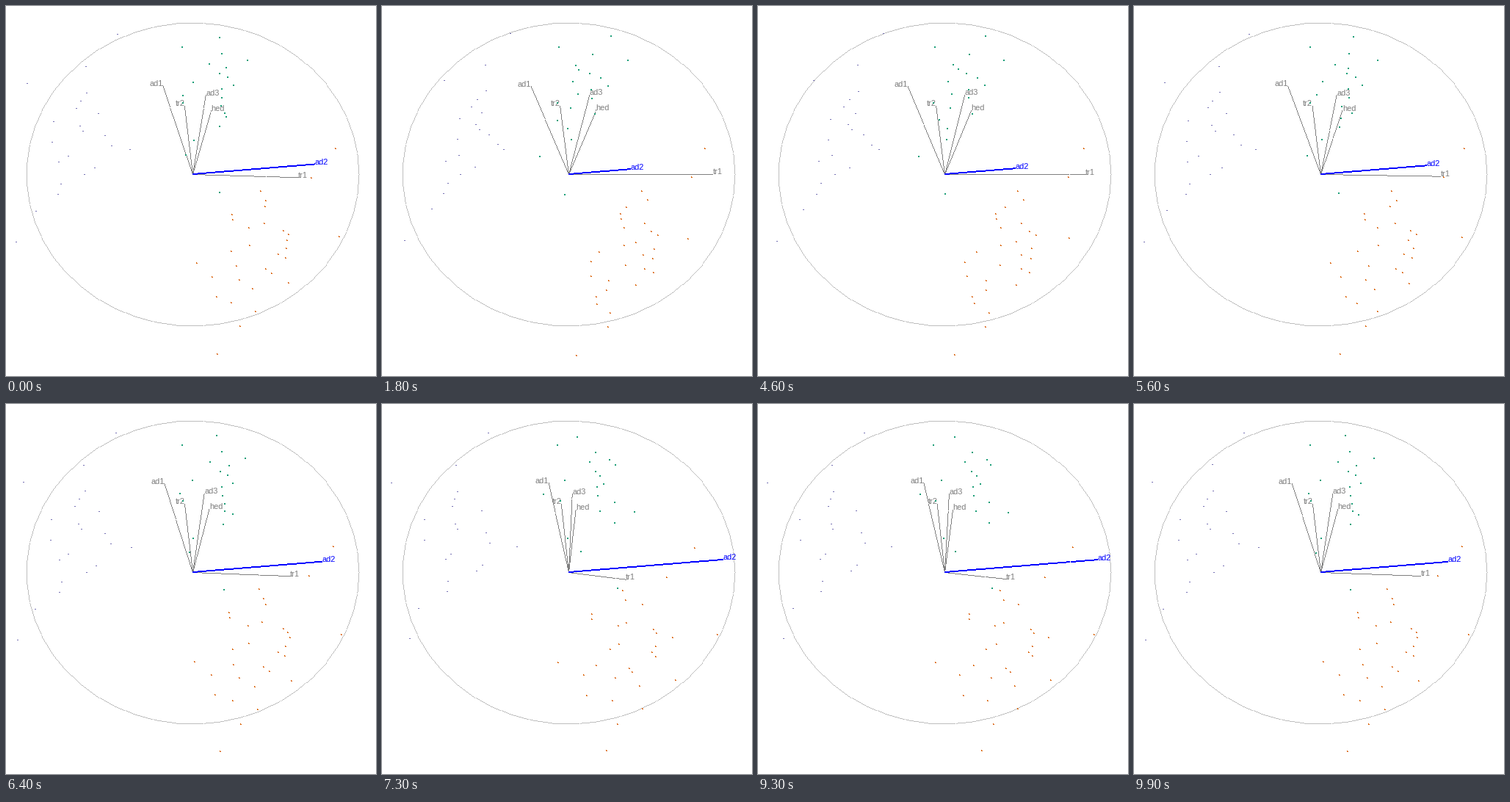
A matplotlib script that plays this animation: 504x504 px, repeating every 10000 ms.

```python
import numpy as np
import matplotlib.pyplot as plt
from matplotlib.animation import FuncAnimation
from matplotlib.collections import PolyCollection

SIZE = 504
CENTER = np.array([254.5, 229.5])
RADIUS = np.array([226.5, -206.5])
TILT = np.radians(5.1)          # in-plane direction of the manipulated variable
UNIT = 0.188                    # one measuring unit of that variable
REF = np.radians(68.1)          # rotation at which the clusters are laid out

START, FAR, NEAR = 42.6, 85.1, -4.9
KEYS = [0, 15, 16, 47, 48, 65]
ANGLES = [START, FAR, FAR, NEAR, NEAR, START]

GREY, BLUE = "#7F7F7F", "#0000FF"
CELL = np.array([(0, 0), (1, 0), (1, 1), (0, 1)])

# pixel glyphs
SQUARE = [(-1, -1), (0, -1), (-1, 0), (0, 0)]
WEDGE = [(-1, -1), (-1, 0), (0, 0)]
DASH = [(-1, 0), (0, 0)]

# name: (share along the radial direction, share across it)
AXES = {
    "tr1": (0.931, -0.077),
    "tr2": (-0.013, 0.455),
    "hed": (0.217, 0.4075),
    "ad1": (-0.188, 0.598),
    "ad3": (0.184, 0.512),
    "ad2": (0, 0),
}

ROT = np.array([[np.cos(TILT), np.sin(TILT)], [-np.sin(TILT), np.cos(TILT)]])


def to_px(u, v):
    return CENTER + RADIUS * (np.column_stack([u, v]) @ ROT)


def from_px(x, y):
    return (((np.column_stack([x, y]) - CENTER) / RADIUS) @ ROT.T).T


def cluster(rng, count, level, x, y, noise):
    """Manipulated, residual and fixed coordinates of one bell-shaped cloud.

    level: mean, spread and slope of the whole-number manipulated variable
    x: mean, slope with height, slope with level;  y: median, spread, skew
    """
    p = (np.arange(count) + 0.5) / count
    z = 0.57 * np.log(p / (1 - p))
    extra = level[1] * rng.permutation(z) + level[2] * z
    n = np.round(level[0] + extra)
    px = x[0] + x[1] * z + x[2] * (n - level[0]) + noise * rng.permutation(z)
    py = y[0] + y[1] * z + y[2] * z**2
    u, v = from_px(px, py)
    m = UNIT * n
    return m, (u - np.cos(REF) * m) / np.sin(REF), v


def segment(p, q):
    """Pixels of a hard-edged line."""
    return np.floor(np.linspace(p, q, int(np.abs(q - p).max()) + 1))


def pixels(color, zorder):
    coll = PolyCollection([], facecolors=color, edgecolors="none",
                          antialiaseds=False, zorder=zorder)
    return ax.add_collection(coll, autolim=False)


def fill(coll, cells):
    coll.set_verts(cells[:, None, :] + CELL)


fig = plt.figure(figsize=(SIZE / 72, SIZE / 72), dpi=72, facecolor="white")
ax = fig.add_axes([0, 0, 1, 1])
ax.set(xlim=(0, SIZE), ylim=(SIZE, 0))
ax.axis("off")

turn = np.linspace(0, 2 * np.pi, 50)
ring = CENTER + RADIUS * np.column_stack([np.cos(turn), np.sin(turn)])
fill(pixels("#BEBEBE", 1),
     np.vstack([segment(p, q) for p, q in zip(ring, ring[1:])]))

share = np.array(list(AXES.values()))
manip = np.array([float(name == "ad2") for name in AXES])
spokes, labels = [], []
for name in AXES:
    color = BLUE if name == "ad2" else GREY
    spokes.append(pixels(color, 2))
    labels.append(ax.text(0, 0, name, color=color, fontsize=11,
                          family="Liberation Sans", va="baseline"))

rng = np.random.default_rng(7)
clouds = [
    (pixels("#1B9E77", 4), np.array(SQUARE),
     cluster(rng, 21, (1.0, 0.8, 0.25), (271, -14, 0), (114, 51, 7.8), 24)),
    (pixels("#D95F02", 4), np.array(WEDGE),
     cluster(rng, 31, (1.3, 1.05, 0), (339, -33, 18), (335, 60, 0), 22)),
    (pixels("#7570B3", 4), np.array(DASH),
     cluster(rng, 22, (-2.9, 0.9, 0), (117, -18, 18), (178, 66, 0), 13)),
]


def draw(k):
    # two ticks per step at first, then double speed
    step = k // 2 if k < 70 else k - 35
    a = np.radians(np.interp(step, KEYS, ANGLES))
    c, s = np.cos(a), np.sin(a)

    ends = to_px(c * manip + s * share[:, 0], share[:, 1])
    for end, hot, spoke, label in zip(ends, manip, spokes, labels):
        line = segment(CENTER, end)
        fill(spoke, np.vstack([line, line - (0, 1)]) if hot else line)
        label.set_position(end)
        label.set_ha("left" if end[0] > CENTER[0] else "right")

    for coll, glyph, (m, r, v) in clouds:
        spots = np.round(to_px(c * m + s * r, v))
        fill(coll, (spots[:, None, :] + glyph).reshape(-1, 2))
    return spokes + labels + [cloud[0] for cloud in clouds]


anim = FuncAnimation(fig, draw, frames=100, interval=100, repeat=True,
                     repeat_delay=0, blit=False)
plt.show()
```
